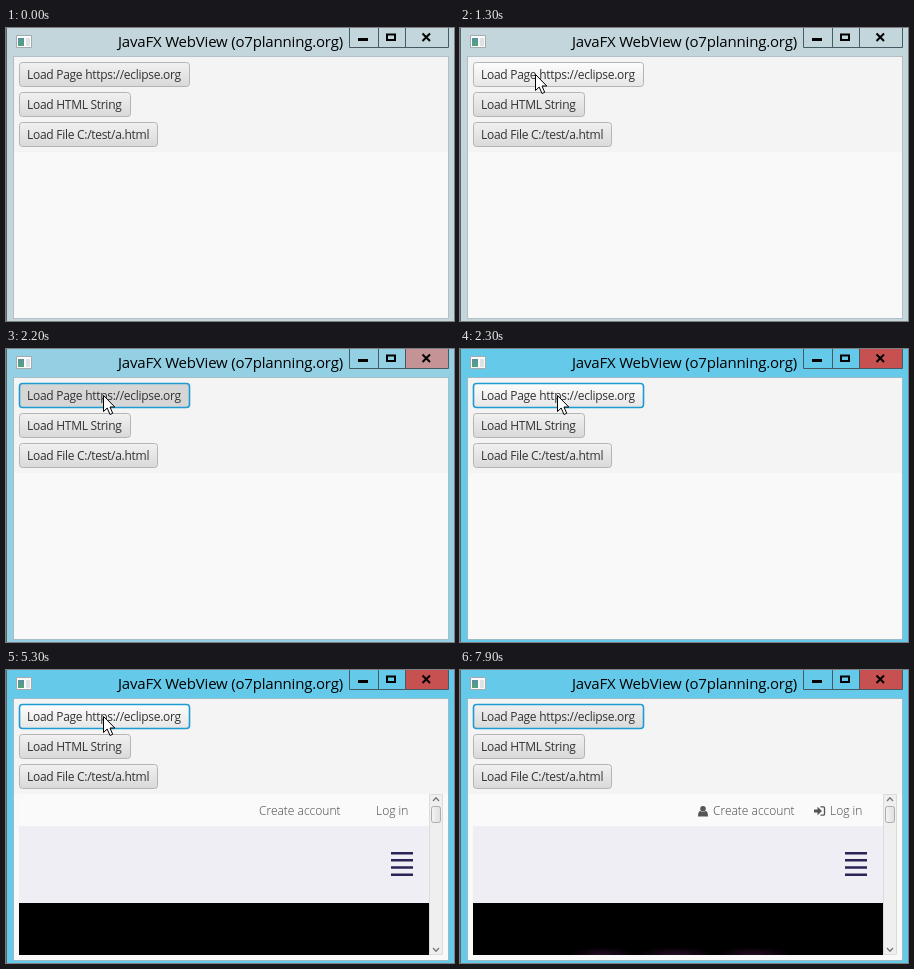
An HTML page for the animation above (8 s loop, 448x293 px).

```html
<!DOCTYPE html>
<html lang="en">
<head>
<meta charset="utf-8">
<title>WebView demo</title>
<style>
html, body { margin: 0; width: 100%; height: 100%; overflow: hidden; }
svg { display: block; width: 448px; height: 293px; font-family: "Open Sans", "Noto Sans", sans-serif; }
.title { font-size: 15px; letter-spacing: -.19px; }
.btn rect { fill: url(#normal); stroke: #b4b4b4; }
.btn text { font-size: 12px; letter-spacing: -.28px; fill: #333; }
.btn.hover rect { fill: url(#hover); }
.btn.focus rect { stroke: #1e9cd2; stroke-width: 1.6; }
.btn.armed rect { fill: #d6d6d6; }
.link { font-size: 12px; font-weight: 300; fill: #444; }
</style>
</head>
<body>
<svg viewBox="0 0 448 293">
  <defs>
    <linearGradient id="normal" x2="0" y2="1"><stop stop-color="#f1f1f1"/><stop offset="1" stop-color="#d9d9d9"/></linearGradient>
    <linearGradient id="hover" x2="0" y2="1"><stop stop-color="#fdfdfd"/><stop offset="1" stop-color="#e6e6e6"/></linearGradient>
    <linearGradient id="thumbFill"><stop stop-color="#f4f4f4"/><stop offset="1" stop-color="#dedede"/></linearGradient>
    <linearGradient id="teal" x2="0" y2="1"><stop stop-color="#5b8fa0"/><stop offset="1" stop-color="#4fa57c"/></linearGradient>
    <radialGradient id="violet"><stop stop-color="#2b0c2b"/><stop offset="1" stop-color="#2b0c2b" stop-opacity="0"/></radialGradient>
    <clipPath id="view"><path d="M13 124H423V285H13Z"/></clipPath>
  </defs>

  <rect id="frame" width="448" height="293"/>
  <path d="M.5 0V293" stroke="#59666b"/>
  <path d="M7.5 28.5H442.5V290.5H7.5Z" fill="#f9f9f9" stroke="#7f8f96" stroke-opacity=".45"/>
  <path d="M8 29H442V124H8Z" fill="#f4f4f4"/>

  <!-- title bar -->
  <path d="M10.5 7.5H25.5V19.5H10.5Z" fill="#fafafa" stroke="#a3abae"/>
  <path d="M12 10H18V18H12Z" fill="url(#teal)"/>
  <path d="M20 10H24V18H20Z" fill="#dde2e4"/>
  <text class="title" x="112" y="19">JavaFX WebView (o7planning.org)</text>
  <path id="close" d="M399 0H442V19H399Z"/>
  <path d="M343.5 0V19.5H442.5V0M372.5 0V19M399.5 0V19" fill="none" stroke="#465a63"/>
  <path d="M352 10H362V13H352Z"/>
  <path d="M381 6.5H389V12H381Z" fill="none" stroke="#000" stroke-width="2"/>
  <path d="M416.5 5.5 424 13M424 5.5 416.5 13" stroke="#000" stroke-width="2"/>

  <g id="buttons"></g>

  <!-- loaded page -->
  <g id="page">
    <path d="M13 124H423V156H13Z" fill="#fafafa"/>
    <path d="M13 156H423V233H13Z" fill="#efeef4"/>
    <path d="M13 233H423V285H13Z"/>
    <path d="M385 183.2H407M385 190.2H407M385 197.5H407M385 204.7H407" stroke="#2c2255" stroke-width="2.6"/>
    <g id="glow" clip-path="url(#view)" fill="url(#violet)">
      <ellipse cx="143" cy="286" rx="34" ry="9"/>
      <ellipse cx="215" cy="286" rx="42" ry="9"/>
      <ellipse cx="293" cy="286" rx="38" ry="9"/>
    </g>
    <g id="links" class="link">
      <text x="253" y="145">Create account</text>
      <text x="370" y="145">Log in</text>
    </g>
    <g id="icons" fill="#555">
      <circle cx="243" cy="138.8" r="2.8"/>
      <path d="M238 146.5Q238 141 240.5 141Q243 143 245.5 141Q248 141 248 146.5Z"/>
      <path d="M354 139.5H357.5V136.8L362 141 357.5 145.2V142.5H354Z"/>
      <path d="M360.5 136.8H363.5Q364.5 136.8 364.5 138V144Q364.5 145.2 363.5 145.2H360.5" fill="none" stroke="#555" stroke-width="1.3"/>
    </g>
    <path d="M423.5 124.5H436.5V284.5H423.5Z" fill="#efefef" stroke="#dcdcdc"/>
    <rect x="425.5" y="136.5" width="9" height="16" rx="2" fill="url(#thumbFill)" stroke="#adadad"/>
    <path d="M427 131 430 127.800 433 131M427 278 430 281.200 433 278" fill="none" stroke="#777" stroke-width="1.3"/>
  </g>

  <path id="cursor" d="M.5 .5V16.500L4.200 13 7 19.500 9.700 18.300 7 12H11.800Z" fill="#fff" stroke="#000"/>
</svg>
<script>
const LOOP = 8000, STEP = 100;
const el = id => document.getElementById(id);

// label, top, width
const buttons = [
  ["Load Page https://eclipse.org", 34, 171],
  ["Load HTML String", 64, 112],
  ["Load File C:/test/a.html", 94, 139]
].map(([label, top, width]) => {
  el("buttons").insertAdjacentHTML("beforeend",
    `<g class="btn"><rect x="13.5" y="${top + .5}" width="${width - 1}" height="24" rx="3"/>
     <text x="21" y="${top + 17}">${label}</text></g>`);
  return { node: el("buttons").lastElementChild, top, width };
});

// pointer path: time, x, y
const path = [
  [200, 377, 66], [500, 190, 60], [800, 31, 46], [1000, 72, 46],
  [1300, 75, 46], [1600, 130, 49], [1900, 106, 46], [2000, 97, 46],
  [7100, 97, 46], [7300, 26, 62], [7800, 363, 152]
];

function pointAt(t) {
  const i = Math.max(1, path.findIndex(p => p[0] >= t));
  const [t0, x0, y0] = path[i - 1], [t1, x1, y1] = path[i];
  const k = (t - t0) / (t1 - t0);
  return [Math.round(x0 + (x1 - x0) * k), Math.round(y0 + (y1 - y0) * k)];
}

function show(id, on) {
  el(id).style.display = on ? "" : "none";
}

function draw(now) {
  const t = Math.floor(now % LOOP / STEP) * STEP;
  const pointing = t >= 200 && t < 7900;
  const [x, y] = pointing ? pointAt(t) : [-99, -99];
  el("cursor").setAttribute("transform", `translate(${x} ${y})`);

  const phase = t < 2200 ? 0 : t < 2300 ? 1 : 2;
  el("frame").setAttribute("fill", ["#c3d6db", "#94d0e3", "#65caea"][phase]);
  el("close").setAttribute("fill", ["#c3d6db", "#c59396", "#c75050"][phase]);

  buttons.forEach(({ node, top, width }, i) => {
    const inside = x >= 13 && x < 13 + width && y >= top && y < top + 25;
    node.classList.toggle("hover", inside);
    node.classList.toggle("focus", i === 0 && phase > 0);
    node.classList.toggle("armed", i === 0 && phase === 1);
  });

  show("page", t >= 5000);
  show("links", t >= 5300);
  show("glow", t >= 7000);
  show("icons", t >= 7200);
  requestAnimationFrame(() => draw(performance.now() - start));
}

const start = performance.now();
draw(0);
</script>
</body>
</html>
```
